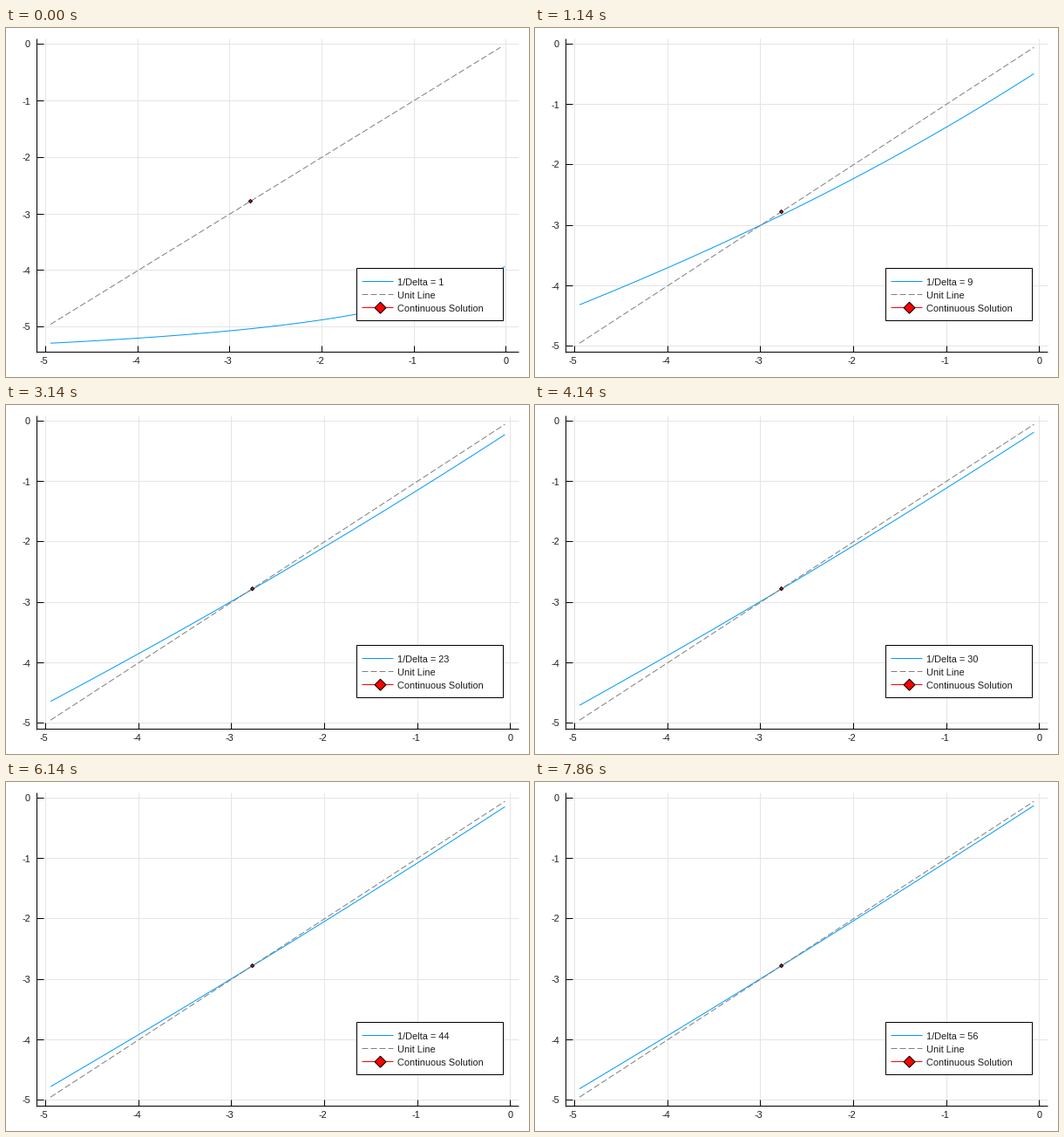
Write a matplotlib script that moves like this. It is 600 by 400 pixels and loops after 8000 ms.

```python
import numpy as np
import matplotlib.pyplot as plt
from matplotlib.animation import FuncAnimation
from matplotlib.patches import Polygon, Rectangle

plt.rcParams["font.family"] = "Liberation Sans"
W, H, DPI = 600, 400, 100
PX = 72 / DPI                      # one pixel in points
LEFT, RIGHT, TOP, BOTTOM = 35.4, 588, 12, 371.4
BLUE, GRAY, INK = "#009afa", "#808080", "#1c1c1c"

STEP, LOOP, STAGES = 20, 8000, 56  # ms, ms, curves per loop

# Scalar Riccati recursion with step 1/n
Q, S, A = 3.92, 0.485, -0.0324
X_LO, X_HI = -4.95, -0.06
FIXED = -(A + np.sqrt(A * A + S * Q)) / S
TICKS = range(-5, 1)


def riccati(x, n):
    return -Q / n + (1 + A / n) ** 2 * x / (1 - S * x / n)


def scale(lo, hi, start, end):
    """Map data to pixels with a 3% margin on both sides."""
    pad = 0.03 * (hi - lo)
    k = (end - start) / (hi - lo + 2 * pad)
    return lambda v: start + (v - lo + pad) * k


fig = plt.figure(figsize=(W / DPI, H / DPI), dpi=DPI, facecolor="white")
ax = fig.add_axes([0, 0, 1, 1])
ax.set_xlim(0, W)
ax.set_ylim(H, 0)
ax.axis("off")


def line(xs=(), ys=(), color="black", z=2, **kw):
    return ax.plot(xs, ys, color=color, lw=PX, zorder=z,
                   solid_capstyle="butt", **kw)[0]


def label(x, y, text, ha="left", z=3):
    return ax.text(x, y, text, size=11 * PX, color=INK, ha=ha,
                   va="baseline", zorder=z)


def diamond(x, y, r):
    return [(x - r, y), (x, y - r), (x + r, y), (x, y + r)]


def add_diamond(r, z, x=0, y=0):
    return ax.add_patch(Polygon(diamond(x, y, r), facecolor="red",
                                edgecolor="black", lw=PX, zorder=z))


# Axes, grid and tick labels
line([LEFT, LEFT], [TOP, BOTTOM + 0.5])
line([LEFT, RIGHT], [BOTTOM, BOTTOM])
grid_x = [line(color="#e5e5e5", z=1) for _ in TICKS]
grid_y = [line(color="#e5e5e5", z=1) for _ in TICKS]
tick_x = [line() for _ in TICKS]
tick_y = [line() for _ in TICKS]
text_x = [label(0, 385, str(v), "center") for v in TICKS]
text_y = [label(28, 0, str(v), "right") for v in TICKS]

# Series
DASH = dict(dashes=(7, 3), dash_capstyle="butt")
curve = line(color=BLUE, z=4)
unit = line(color=GRAY, z=5, **DASH)
point = add_diamond(2.1, 6)

# Legend
ax.add_patch(Rectangle((402, 275), 168, 60, facecolor="white",
                       edgecolor="black", lw=PX, zorder=7))
line([408, 444], [290, 290], BLUE, 8)
line([408, 444], [305, 305], GRAY, 8, **DASH)
line([408, 444], [320, 320], "red", 8)
add_diamond(6.5, 9, 429.5, 320.7)
stage_text = label(449, 295, "", z=8)
label(449, 310, "Unit Line", z=8)
label(449, 325, "Continuous Solution", z=8)


def update(i):
    n = 1 + (STEP * i + 15) * STAGES // LOOP
    x_end = -0.012 if n == 1 else X_HI
    xs = np.linspace(X_LO, x_end, 120)
    ys = riccati(xs, n)
    to_x = scale(X_LO, x_end, LEFT, RIGHT)
    to_y = scale(min(X_LO, ys[0]), X_HI, BOTTOM, TOP)

    for k, v in enumerate(TICKS):
        x, y = np.floor(to_x(v)), np.floor(to_y(v))
        grid_x[k].set_data([x, x], [TOP, BOTTOM])
        grid_y[k].set_data([LEFT, RIGHT], [y, y])
        tick_x[k].set_data([x, x], [BOTTOM, BOTTOM - 7])
        tick_y[k].set_data([LEFT, LEFT + 7.5], [y, y])
        text_x[k].set_x(x - (1.5 if v else -0.5))
        text_y[k].set_y(y + 4.5)

    curve.set_data(to_x(xs), to_y(ys))
    ends = np.array([X_LO, X_HI])
    unit.set_data(to_x(ends), to_y(ends))
    point.set_xy(diamond(to_x(FIXED), to_y(FIXED), 2.1))
    stage_text.set_text(f"1/Delta = {n}")
    return []


anim = FuncAnimation(fig, update, frames=LOOP // STEP, interval=STEP,
                     init_func=lambda: update(0), repeat=True,
                     repeat_delay=0, blit=False)
plt.show()
```
